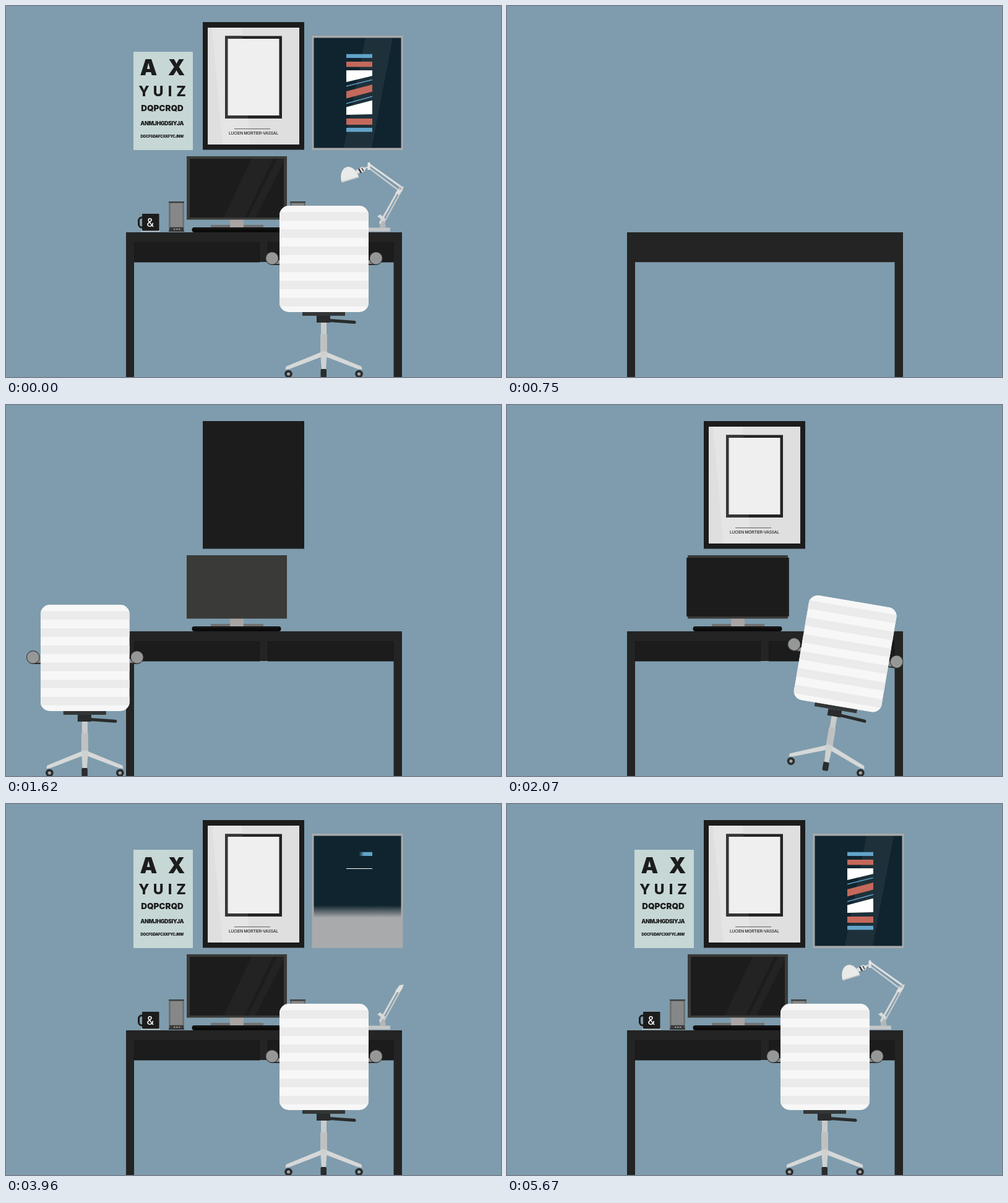
Recreate the animation shown at these times as an HTML page with a canvas. Size 800 px wide and 600 px high, loop 7.14 s.

```html
<!DOCTYPE html>
<html lang="en">
<head>
<meta charset="utf-8">
<title>Desk</title>
<style>
html, body { margin: 0; width: 100%; height: 100%; overflow: hidden; background: #7e9cad; }
canvas { display: block; }
</style>
</head>
<body>
<canvas id="stage" width="800" height="600"></canvas>
<script>
const c = document.getElementById('stage').getContext('2d');
const LOOP = 7140, WALL = '#7e9cad', INK = '#1c1c1c', DESK = '#242424';

// Progress 0..1 of a step that starts at a and lasts d
const step = (t, a, d) => Math.min(1, Math.max(0, (t - a) / d));
const out = (u, n = 3) => 1 - (1 - u) ** n;
const back = (u, s = 1.7) => u <= 0 ? 0 : 1 + (s + 1) * (u - 1) ** 3 + s * (u - 1) ** 2;

function box(color, x, y, w, h, r = 0) {
  c.fillStyle = color;
  c.beginPath();
  c.roundRect(x, y, w, h, r);
  c.fill();
}
function poly(color, ...pts) {
  c.fillStyle = color;
  c.beginPath();
  for (let i = 0; i < pts.length; i += 2) c.lineTo(pts[i], pts[i + 1]);
  c.fill();
}
function line(color, width, ...pts) {
  c.strokeStyle = color;
  c.lineWidth = width;
  c.beginPath();
  for (let i = 0; i < pts.length; i += 2) c.lineTo(pts[i], pts[i + 1]);
  c.stroke();
}
function dot(color, x, y, r) {
  c.fillStyle = color;
  c.beginPath();
  c.arc(x, y, r, 0, 7);
  c.fill();
}
// Gradient from clear to the colour
function fade(color, x0, y0, x1, y1) {
  const g = c.createLinearGradient(x0, y0, x1, y1);
  g.addColorStop(0, color + '00');
  g.addColorStop(1, color);
  return g;
}
function text(str, x, y, size, weight, color = INK, spacing = 0) {
  c.font = `${weight} ${size}px Inter, "Open Sans", sans-serif`;
  c.letterSpacing = spacing + 'px';
  c.textAlign = 'center';
  c.fillStyle = color;
  c.fillText(str, x + spacing / 2, y);
}
// Draw scaled and turned about a pivot
function about(x, y, sx, sy, turn, draw) {
  if (!sx || !sy) return;
  c.save();
  c.translate(x, y);
  c.rotate(turn * Math.PI / 180);
  c.scale(sx, sy);
  c.translate(-x, -y);
  draw();
  c.restore();
}
function show(alpha, draw) {
  if (alpha <= 0) return;
  c.save();
  c.globalAlpha = alpha;
  draw();
  c.restore();
}
function clip(x, y, w, h, draw) {
  c.save();
  c.beginPath();
  c.rect(x, y, w, h);
  c.clip();
  draw();
  c.restore();
}

function desk(t) {
  const rise = step(t, 300, 232);
  if (!rise) return;
  const top = 600 - 234 * out(rise, 2);
  if (rise < 1) return box(fade(DESK, 0, top - 3, 0, top + 5), 194, top - 3, 446, 640 - top);
  box(DESK, 194, 366, 446, 260);
  const hole = 190 * out(step(t, 540, 240));
  box(WALL, 207, 604 - hole, 419.5, hole + 20);
  for (const [x, w, start] of [[207, 203, 1060], [423, 203.5, 960]]) {
    const s = back(step(t, start, 240));
    about(x + w / 2, 398, s, s, 0, () => {
      box('#171717', x, 382, w, 32.5);
      box(INK, x + 1, 383, w - 2, 30);
    });
  }
}

function monitor(t) {
  const key = back(step(t, 1020, 140), 1);
  const base = step(t, 1130, 120);
  const neck = step(t, 1050, 60);
  box('#707274', 331, 354, 85 * base, 4);
  box('#a8a5a4', 362, 358 - 13 * neck, 22, 13 * neck);
  about(372.5, 362, key, 1, 0, () => {
    box('#0b0b0b', 300.5, 358, 144, 8, 4);
    box('#1d1d1d', 304, 359, 137, 1.5, 1);
  });
  const tall = back(step(t, 1080, 240), 2.8);
  const wide = Math.max(.14, back(step(t, 1160, 320)));
  about(373, 345.5, wide, tall, 0, () => box('#3a3a38', 292, 243, 162, 102.5));
  about(373, 294, back(step(t, 1980, 180)), 1, 0, () => box(INK, 297, 247, 152, 95));
  show(step(t, 2460, 200) * .03, () => {
    poly('#fff', 397, 247, 432, 247, 386, 342, 352, 342);
    poly('#fff', 438, 247, 449, 247, 449, 252, 403, 342, 391, 342);
  });
}

function speaker(t, x) {
  const h = 49 * out(step(t, 2760, 220));
  box('#383838', x, 365 - h, 25, h);
  const w = step(t, 3090, 140);
  if (!w) return;
  const y = 319 + 44 * w;
  clip(x, 316, 25, y - 316, () => {
    box('#707273', x, 318, 25, 47);
    box('#868788', x + 3, 319, 19, 38);
    box('#414242', x, 316, 25, 2.5);
    box('#3a3a3a', x + 1, 358, 23, 7);
    for (let i = 0; i < 3; i++) box('#999', x + 8 + i * 4, 360, 2.5, 2);
  });
  if (w < 1) box(fade('#383838', 0, y - 8, 0, y), x, y - 8, 25, 8);
}

function cup(t) {
  const s = step(t, 2940, 120);
  box('#c9d0d2', 233.5 - 15 * s, 363, 30 * s, 2);
  show(step(t, 3000, 80), () => {
    c.translate(0, -20 * (1 - step(t, 3000, 210) ** 2));
    c.strokeStyle = INK;
    c.lineWidth = 3;
    c.beginPath();
    c.roundRect(214.5, 342, 12, 16, 5);
    c.stroke();
    box(INK, 220, 336, 27.5, 27.5, 1);
    text('&', 233.2, 356.5, 18.5, 400, '#fff');
  });
}

function chart(t) {
  const u = step(t, 2850, 380);
  if (!u) return;
  const top = 233 - 159 * u;
  clip(206, 74, 96, 159, () =>
    box(u < 1 ? fade('#c6d7d6', 0, top - 2, 0, top + 10) : '#c6d7d6', 206, 74, 96, 159));
  const row = (start, draw) => show(step(t, start, 100), draw);
  row(3260, () => { text('A', 230.3, 112.3, 35, 900); text('X', 275.5, 112.3, 35, 900); });
  row(3180, () => [['Y', 223], ['U', 246], ['I', 265], ['Z', 283]].forEach(([s, x]) => text(s, x, 145.7, 23, 800)));
  row(3100, () => text('DQPCRQD', 252.5, 169.7, 13.5, 900));
  row(3040, () => text('ANMJHGDSIYJA', 252.5, 193, 8.9, 900, INK, -.4));
  row(2980, () => text('DOCFGDAFCXKFYCJNW', 252.5, 212.8, 5.9, 900, INK, -.2));
}

function print(t) {
  const u = step(t, 960, 540);
  if (!u) return;
  const half = 126 * u ** 1.6;
  clip(318, 26, 164, 206.5, () => {
    c.transform(1, 20 / 164, 0, 1, 0, -400 * 20 / 164);
    box(fade(INK, 0, 124 - half - 4, 0, 124 - half + 3), 318, 120 - half, 164, half + 4.5);
    box(fade(INK, 0, 124 + half + 4, 0, 124 + half - 3), 318, 124, 164, half + 4);
  });
  const mat = 189 * out(step(t, 1730, 140));
  clip(326, 129.5 - mat / 2, 148, mat, () => {
    box('#dfdfdf', 326, 35, 148, 189);
    poly('#e5e5e5', 333, 35, 381, 35, 394, 224, 350, 224);
  });
  const inner = back(step(t, 1800, 160), 1);
  about(400, 115, inner, inner, 0, () => {
    box('#242424', 354, 48.5, 92, 133.5);
    poly('#363636', 354, 48.5, 382, 48.5, 391, 182, 354, 182);
    box('#efefef', 358.5, 53, 83, 124);
  });
  const rule = 58 * out(step(t, 1880, 120));
  box('#777', 398 - rule / 2, 198, rule, 1.2);
  show(step(t, 1920, 120), () => text('LUCIEN MORTIER-VASSAL', 400, 208, 6.6, 500, '#222', -.2));
}

const BLUE = '#62a4c9', RED = '#c4695b', WHITE = '#fff';
// colour, left top, right top, left bottom, right bottom, start; whites fall, others come from the right
const bands = [
  [BLUE, 77.5, 77.5, 84, 84, 3930], [RED, 90, 90, 98.5, 98.5, 4000],
  [WHITE, 104, 104, 123, 113, 3950], [BLUE, 129, 118.5, 130.6, 120, 4080],
  [RED, 138, 127, 149.5, 138.5, 4140], [BLUE, 157, 145.5, 158.6, 147, 4200],
  [WHITE, 163.5, 152.5, 176, 175, 4220], [RED, 182, 182, 192, 192, 4290],
  [BLUE, 197, 197, 203.5, 203.5, 4340]
];
function art(t) {
  const frame = 185 * out(step(t, 3480, 300));
  box('#a9aaab', 494.5, 48, 147, frame);
  const u = step(t, 3880, 120);
  if (!u) return;
  const edge = 51 + 182 * u;
  clip(497.5, 51.5, 141, 178, () =>
    box(u < 1 ? fade('#10242f', 0, edge + 10, 0, edge - 10) : '#10242f', 497, 51, 142, 179));
  show(step(t, 4400, 160) * .06, () => poly(WHITE, 581, 51.5, 625, 51.5, 591, 229.5, 546, 229.5));
  for (const [color, a, b, d, e, start] of bands) {
    const white = color === WHITE;
    const k = step(t, start, white ? 200 : 60);
    if (!k) continue;
    const x = white ? 550 : 592 - 42 * k;
    const h = white ? Math.max(1, (Math.max(d, e) - Math.min(a, b)) * k) : 200;
    clip(x, Math.min(a, b), 592 - x, h, () => {
      const soft = !white && k < 1 ? fade(color, x, 0, x + 8, 0) : color;
      poly(soft, 550, a, 592, b, 592, e, 550, d);
    });
  }
}

function lamp(t) {
  const base = out(step(t, 2880, 160));
  box('#c4c6c7', 621 - 40 * base, 358.5, 40 * base, 6, 1);
  const post = step(t, 3000, 120);
  about(608, 358, 1, post, 0, () => {
    poly('#b4b6b7', 604, 346, 611, 343, 614, 359, 604, 359);
    poly('#d9dadb', 600, 340, 605, 337, 614, 345, 610, 348);
  });
  const low = step(t, 3200, 480);
  about(607, 352, Math.min(1, low * 2), Math.min(1, low * 2), 14 * Math.sin(low * 9) * (1 - low), () => {
    line('#d7d8d9', 3, 604, 352, 633, 300);
    line('#c5c7c8', 2.5, 611, 350, 640, 297);
    poly('#dfe0e0', 629, 303, 636, 293, 643, 292, 640, 299, 635, 305);
  });
  const up = step(t, 3980, 420);
  about(638, 295, out(up), out(up), 30 * Math.cos(up * 8) * (1 - up), () => {
    line('#e1e2e2', 2.8, 639, 293, 587, 256);
    line('#cdcfd0', 2.2, 633, 297, 588, 263);
    dot('#b5b7b8', 637, 295, 2.5);
    box('#e6e7e7', 584.5, 253, 4, 12, 1);
  });
  const size = back(step(t, 4640, 240), .8);
  const swing = 5 * Math.sin((t - 4700) / 75) * (1 - step(t, 4640, 1030)) ** 1.5;
  about(586, 259, size, size, swing, () => {
    line('#d3d5d6', 2.5, 586, 260, 578, 263);
    poly('#dcdedf', 565, 266, 575, 260, 582, 262, 579, 268, 568, 271);
    line('#333', 2.5, 570, 263, 574, 270);
    line('#444', 1.5, 575, 262, 578, 267);
    about(554, 273, 1, 1, -17, () => {
      c.fillStyle = '#e9eaea';
      c.beginPath();
      c.ellipse(554, 281, 14.5, 21, 0, Math.PI, 2 * Math.PI);
      c.fill();
      box('#c9cbcc', 539.5, 280, 29, 2);
    });
  });
}

function chair(t) {
  const u = step(t, 1440, 480);
  if (!u) return;
  // Rolls in, tips on its front wheel, drops back
  const v = t < 2070 ? Math.sin(step(t, 1900, 170) * Math.PI / 2) : 1 - step(t, 2070, 230) ** 2;
  const hop = Math.sin(Math.PI * step(t, 2300, 110));
  c.save();
  c.translate(-620 * (1 - u), 0);
  about(571, 600, 1, 1, 9.6 * v + hop, () => {
    for (const [x, d] of [[430, 1], [598, -1]]) {
      line('#2b2b2b', 2, x - d * 6, 416, x, 418, x + d * 14, 418);
      box('#8b8d8d', Math.min(x, x + d * 14), 411, 14, 6);
      dot('#303030', x, 408, 10.7);
      dot('#969898', x, 408, 9.8);
    }
    box('#333637', 479, 494, 69, 7);
    box('#292b2c', 502, 501, 22, 11);
    poly('#292b2c', 522, 506, 564, 509, 566, 511.5, 564, 514, 522, 511);
    c.save();
    c.beginPath();
    c.roundRect(442, 323, 144, 172, 15);
    c.clip();
    box('#f7f7f7', 442, 323, 144, 172);
    for (let i = 0; i < 6; i++) box('#ebebeb', 442, 333.5 + i * 27.7, 144, 13.8);
    c.restore();
    box('#c9cbcb', 509, 512, 9, 19);
    box('#bfc1c1', 508, 531, 11, 31);
    for (const [x, d] of [[456.5, 1], [570.5, -1]]) {
      dot('#2a2c2d', x, 595, 6.3);
      dot('#a3a5a5', x, 595, 2.6);
      poly('#d6d8d8', 513.5, 558, 513.5, 566, x + d * 2, 587, x - d * 5, 588, x - d * 4, 583);
    }
    poly('#cfd1d1', 508, 559, 519, 559, 517, 588, 510, 588);
    box('#2a2c2d', 508.5, 587, 9.5, 14, 2);
  });
  c.restore();
}

function draw(now) {
  let t = now % LOOP;
  if (t < 30) t = LOOP;
  box(WALL, 0, 0, 800, 600);
  print(t);
  chart(t);
  art(t);
  c.save();
  c.translate(0, 18 * Math.sin(Math.PI * step(t, 1050, 300)));
  desk(t);
  speaker(t, 263);
  speaker(t, 459);
  monitor(t);
  cup(t);
  c.restore();
  lamp(t);
  chair(t);
}

const begin = performance.now();
function tick() {
  draw(performance.now() - begin);
  requestAnimationFrame(tick);
}
tick();
</script>
</body>
</html>
```
